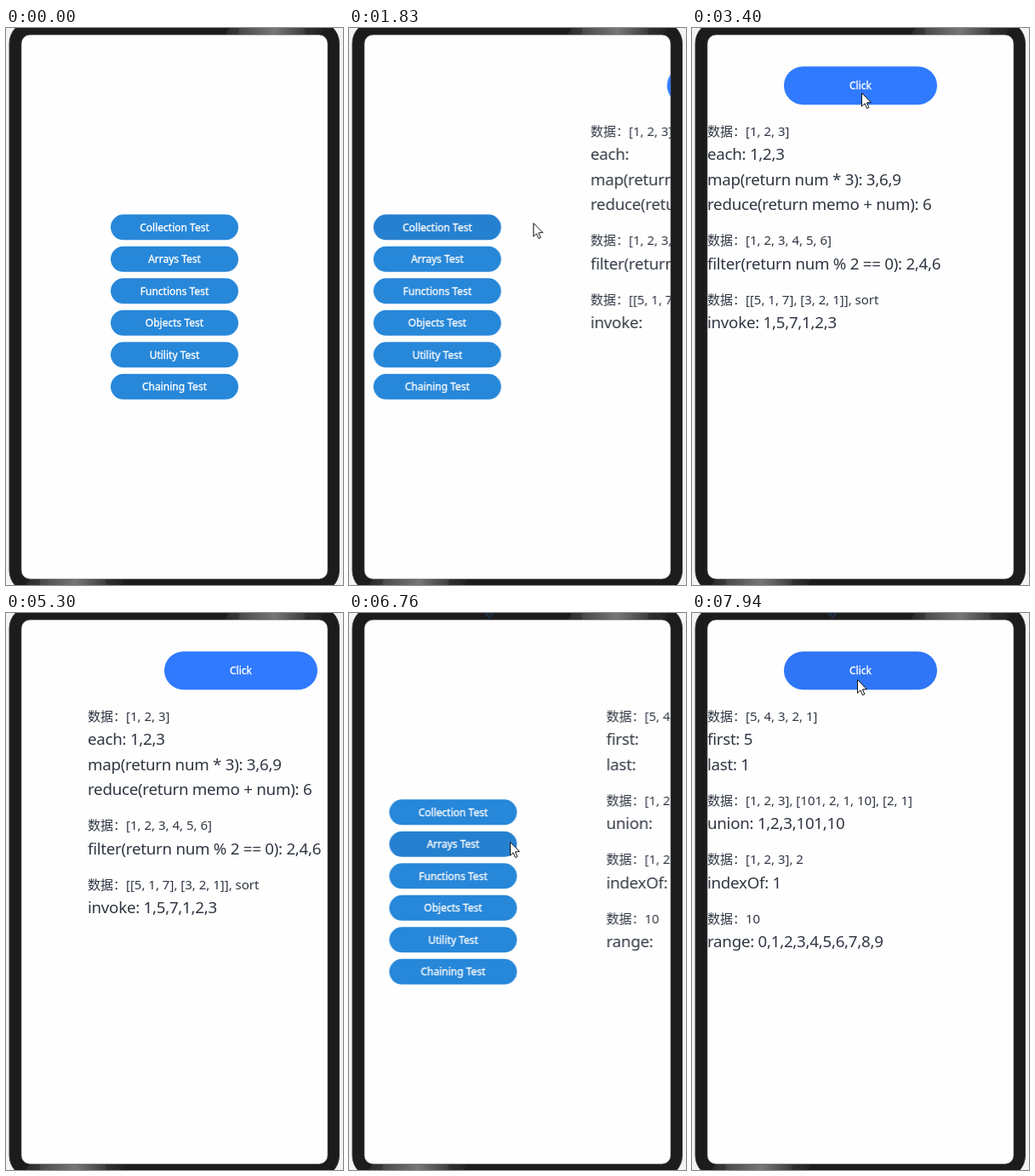
Recreate the animation shown at these times as an HTML page. Size 396x655 px, loop 8000 ms.

```html
<!DOCTYPE html>
<html lang="zh-CN">
<head>
<meta charset="utf-8">
<title>Collection tests</title>
<style>
  html, body { margin: 0; width: 100%; height: 100%; overflow: hidden; background: #f3f5f5; }
  svg { display: block; width: 396px; height: 655px; }
  text { font-family: "Noto Sans", "Noto Sans CJK SC", "Noto Sans CJK", sans-serif; fill: #2f3642; white-space: pre; }
  .small { font-size: 15px; }
  .big { font-size: 18.75px; letter-spacing: -.015em; }
  .label { font-size: 12px; fill: #fff; stroke: #fff; stroke-width: .35px; text-anchor: middle; }
</style>
</head>
<body>
<svg viewBox="0 0 396 655">
  <defs>
    <clipPath id="screen"><rect x="18" y="8" width="360" height="640" rx="10"/></clipPath>
    <linearGradient id="shine">
      <stop offset="0" stop-color="#2b2b2b"/>
      <stop offset=".14" stop-color="#383838"/>
      <stop offset=".15" stop-color="#4a4a4a"/>
      <stop offset=".5" stop-color="#777"/>
      <stop offset=".8" stop-color="#3e3e3e"/>
      <stop offset=".81" stop-color="#303030"/>
      <stop offset="1" stop-color="#222"/>
    </linearGradient>
  </defs>
  <rect x="4" y="-8" width="387.5" height="672" rx="26" fill="#1c1c1c" stroke="#303333"/>
  <path d="M262 0H374L369 8H257Z" fill="url(#shine)"/>
  <path d="M28 648H140L135 655H23Z" fill="url(#shine)"/>
  <g id="notch" fill="#20324c">
    <circle cx="162.5" cy="2" r="1.8"/><circle cx="167.5" cy="2" r="1.8"/><circle cx="165" cy="5" r="1.6"/>
  </g>
  <rect x="18" y="8" width="360" height="640" rx="10" fill="#fefefe" stroke="#555" stroke-width=".6"/>
  <g clip-path="url(#screen)" id="view"></g>
  <path id="cursor" d="M.5.5V16.2L4 12.8 6.5 18.6 8.9 17.5 6.4 11.9 11.4 11.6Z" fill="#fff" stroke="#111" stroke-linejoin="round"/>
</svg>
<script>
const LOOP = 8000, SLIDE = 385, WIDTH = 360;
const GLIDE = 'cubic-bezier(.2,0,.2,1)';
const BLUE = '#2787d9', BLUE_DOWN = '#2680d0', ACCENT = '#307aff', ACCENT_DOWN = '#2d6fe8';
const openFirst = 1765, clickFirst = 2790, goBack = 5242, openSecond = 6703, clickSecond = 7640;
const byId = id => document.getElementById(id);
const view = byId('view'), cursor = byId('cursor');

function add(parent, tag, attrs, text) {
  const el = document.createElementNS('http://www.w3.org/2000/svg', tag);
  for (const k in attrs) el.setAttribute(k, attrs[k]);
  if (text) el.textContent = text;
  return parent.appendChild(el);
}

// steps: [time, value, easing?]
function play(el, prop, steps) {
  const all = [[0, steps[0][1]], ...steps, [LOOP, steps.at(-1)[1]]];
  const frames = all.map(([t, value, easing = 'linear']) => ({ offset: t / LOOP, [prop]: value, easing }));
  el.animate(frames, { duration: LOOP, iterations: Infinity });
}

// hard changes: each value holds until the next time
function hold(el, prop, steps) {
  play(el, prop, steps.map(([t, value]) => [t, value, 'step-end']));
}

const move = (x, y = 0) => `translate(${x}px,${y}px)`;

// legs: [start, end, x, y, easing?]; rests between legs
function travel(el, x, y, legs) {
  const steps = [];
  for (const [start, end, nextX, nextY, easing] of legs) {
    steps.push([start, move(x, y), easing], [end, move(nextX, nextY)]);
    [x, y] = [nextX, nextY];
  }
  play(el, 'transform', steps);
}

function slide(el, x, turns) {
  travel(el, x, 0, turns.map(([t, to]) => [t, t + SLIDE, to, 0, GLIDE]));
}

function press(button, t) {
  play(button, 'fill', [[t, ACCENT], [t + 100, ACCENT_DOWN], [t + 200, ACCENT_DOWN], [t + 360, ACCENT]]);
}

function pill(parent, x, y, w, h, fill, label) {
  const rect = add(parent, 'rect', { x, y, width: w, height: h, rx: h / 2, fill });
  add(parent, 'text', { x: x + w / 2, y: y + h / 2 + 4.2, class: 'label' }, label);
  return rect;
}

// groups: [data, [name, result], ...]
function makePage(groups, clickAt) {
  const page = add(view, 'g', {});
  press(pill(page, 108, 45.2, 180, 45, ACCENT, 'Click'), clickAt);
  let y = 121.5;
  for (const [data, ...rows] of groups) {
    add(page, 'text', { x: 18, y: y + 5.4, class: 'small' }, '数据：' + data);
    y += 27.5;
    for (const [name, result] of rows) {
      const line = add(page, 'text', { x: 18, y: y + 6.2, class: 'big' }, name + ': ');
      hold(add(line, 'tspan', {}, result), 'fillOpacity', [[0, 0], [clickAt + 150, 1]]);
      y += 29.5;
    }
    y += 12.5;
  }
  return page;
}

const home = add(view, 'g', {});
const tests = ['Collection', 'Arrays', 'Functions', 'Objects', 'Utility', 'Chaining']
  .map((name, i) => pill(home, 123, 219.3 + i * 37.5, 150, 30, BLUE, name + ' Test'));

const collection = makePage([
  ['[1, 2, 3]', ['each', '1,2,3'], ['map(return num * 3)', '3,6,9'], ['reduce(return memo + num)', '6']],
  ['[1, 2, 3, 4, 5, 6]', ['filter(return num % 2 == 0)', '2,4,6']],
  ['[[5, 1, 7], [3, 2, 1]], sort', ['invoke', '1,5,7,1,2,3']]
], clickFirst);

const arrays = makePage([
  ['[5, 4, 3, 2, 1]', ['first', '5'], ['last', '1']],
  ['[1, 2, 3], [101, 2, 1, 10], [2, 1]', ['union', '1,2,3,101,10']],
  ['[1, 2, 3], 2', ['indexOf', '1']],
  ['10', ['range', [...Array(10).keys()].join()]]
], clickSecond);

slide(home, 0, [[openFirst, -WIDTH], [goBack, 0], [openSecond, -WIDTH]]);
slide(collection, WIDTH, [[openFirst, 0], [goBack, WIDTH]]);
slide(arrays, WIDTH, [[openSecond, 0]]);

[openFirst, openSecond].forEach((t, i) =>
  hold(tests[i], 'fill', [[t - 350, BLUE_DOWN], [t + 80, BLUE]].reduce((s, step) => [...s, step], [[0, BLUE]])));

travel(cursor, 356, 615, [
  [190, 750, 241, 236, 'ease-out'],
  [930, 1080, 229, 229],
  [1350, 2110, 209, 229],
  [2130, 2390, 198, 63],
  [2560, 2590, 198, 69],
  [3340, 3400, 199, 76],
  [3400, 3900, 238, 424, 'ease-in-out'],
  [3900, 4310, 234, -20, 'cubic-bezier(.75,0,1,.7)'],
  [4320, 5440, 165, -16],
  [5440, 6280, 189, 269, 'cubic-bezier(.4,.23,.6,1)'],
  [6970, 7530, 194, 78, 'ease-in-out']
]);
hold(cursor, 'opacity', [[0, 0], [190, 1], [4305, 0], [5440, 1]]);
hold(byId('notch'), 'opacity', [[0, 0], [5510, 1]]);
</script>
</body>
</html>
```
